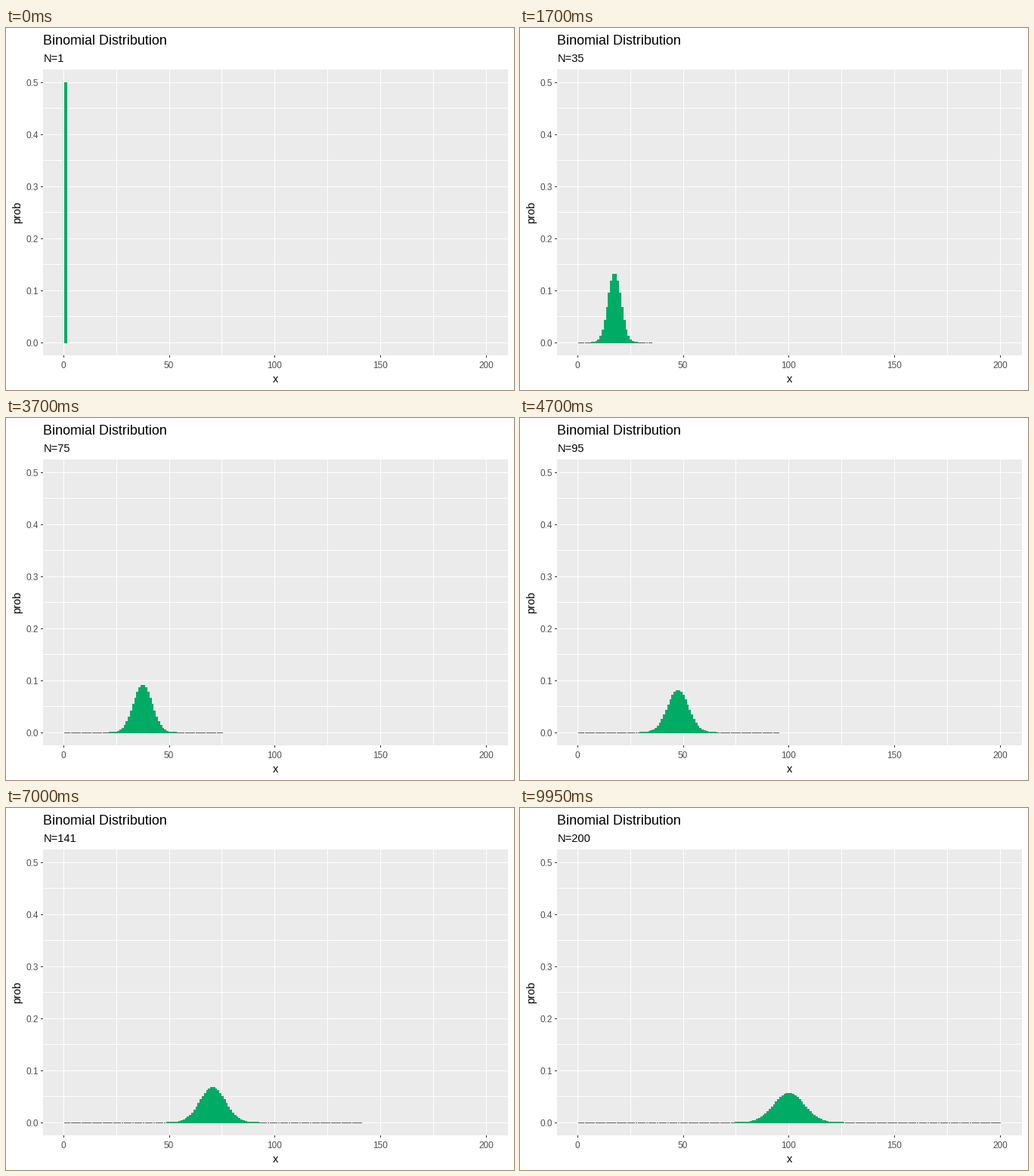
Recreate the animation shown at these times as a matplotlib script. Size 672x480 px, loop 10000 ms.

```python
import math

import matplotlib.pyplot as plt
from matplotlib.animation import FuncAnimation
from matplotlib.collections import PolyCollection
from matplotlib.patches import Rectangle

W, H, DPI = 672, 480, 96
FRAMES, INTERVAL = 200, 50
LEFT, TOP, RIGHT, BOTTOM = 49, 55, 664, 434
X0, X_SCALE = 75.72, 2.797
Y0, Y_SCALE = 416.56, 689.5
GREEN, TAIL = "#00AB66", "#666666"

plt.rcParams["font.family"] = "Liberation Sans"
fig = plt.figure(figsize=(W / DPI, H / DPI), dpi=DPI, facecolor="white")
ax = fig.add_axes([0, 0, 1, 1])
ax.set_xlim(0, W)
ax.set_ylim(H, 0)
ax.axis("off")


def px(x):
    return math.floor(X0 + x * X_SCALE + 0.5)


def py(y):
    return math.floor(Y0 - y * Y_SCALE + 0.5)


def block(x0, y0, x1, y1, color):
    ax.add_patch(Rectangle((x0, y0), x1 - x0, y1 - y0, facecolor=color,
                           linewidth=0, antialiased=False))


def label(x, y, text, size, color="black", **kw):
    return ax.text(x, y, text, fontsize=size, color=color, va="baseline", **kw)


def draw_grid():
    block(LEFT, TOP, RIGHT, BOTTOM, "#EBEBEB")
    for i in range(11):
        y = py(i * 0.05)
        block(LEFT, y, RIGHT, y + 1, "white")
        if i % 2 == 0:
            block(LEFT - 3, y, LEFT, y + 1, "#333333")
            label(42.7, y + 5, f"{i * 0.05:.1f}", 8.8, "#4D4D4D", ha="right")
    for x in range(0, 201, 25):
        c = px(x)
        block(c, TOP, c + 1, BOTTOM, "white")
        if x % 50 == 0:
            block(c, BOTTOM, c + 1, BOTTOM + 3, "#333333")
            label(X0 + x * X_SCALE, 451, str(x), 8.8, "#4D4D4D", ha="center")


draw_grid()
label(49.3, 22, "Binomial Distribution", 13.4)
label(356.8, 470, "x", 11, ha="center")
label(19, 244.3, "prob", 11, ha="center", rotation=90, rotation_mode="anchor")
subtitle = label(49.3, 45, "", 11)

bars = PolyCollection([], facecolors=GREEN, linewidths=0, antialiaseds=False)
tails = PolyCollection([], facecolors=TAIL, linewidths=0, antialiaseds=False)
ax.add_collection(tails, autolim=False)
ax.add_collection(bars, autolim=False)


def quad(x0, y0, x1, y1):
    return [(x0, y0), (x1, y0), (x1, y1), (x0, y1)]


def update(i):
    n = i + 1
    base = py(0)
    tall, flat = [], []
    for k in range(1, n + 1):
        top = py(math.comb(n, k) / 2 ** n)
        x0, x1 = px(k - 0.45), px(k + 0.45)
        # Bars too small to fill a pixel collapse to a thin grey dash
        if top < base:
            tall.append(quad(x0, top, x1 + 1, base + 1))
        else:
            flat.append(quad(x0, base, x1, base + 1))
    bars.set_verts(tall)
    tails.set_verts(flat)
    subtitle.set_text(f"N={n}")
    return bars, tails, subtitle


anim = FuncAnimation(fig, update, frames=FRAMES, interval=INTERVAL,
                     repeat=True, repeat_delay=0)
plt.show()
```
